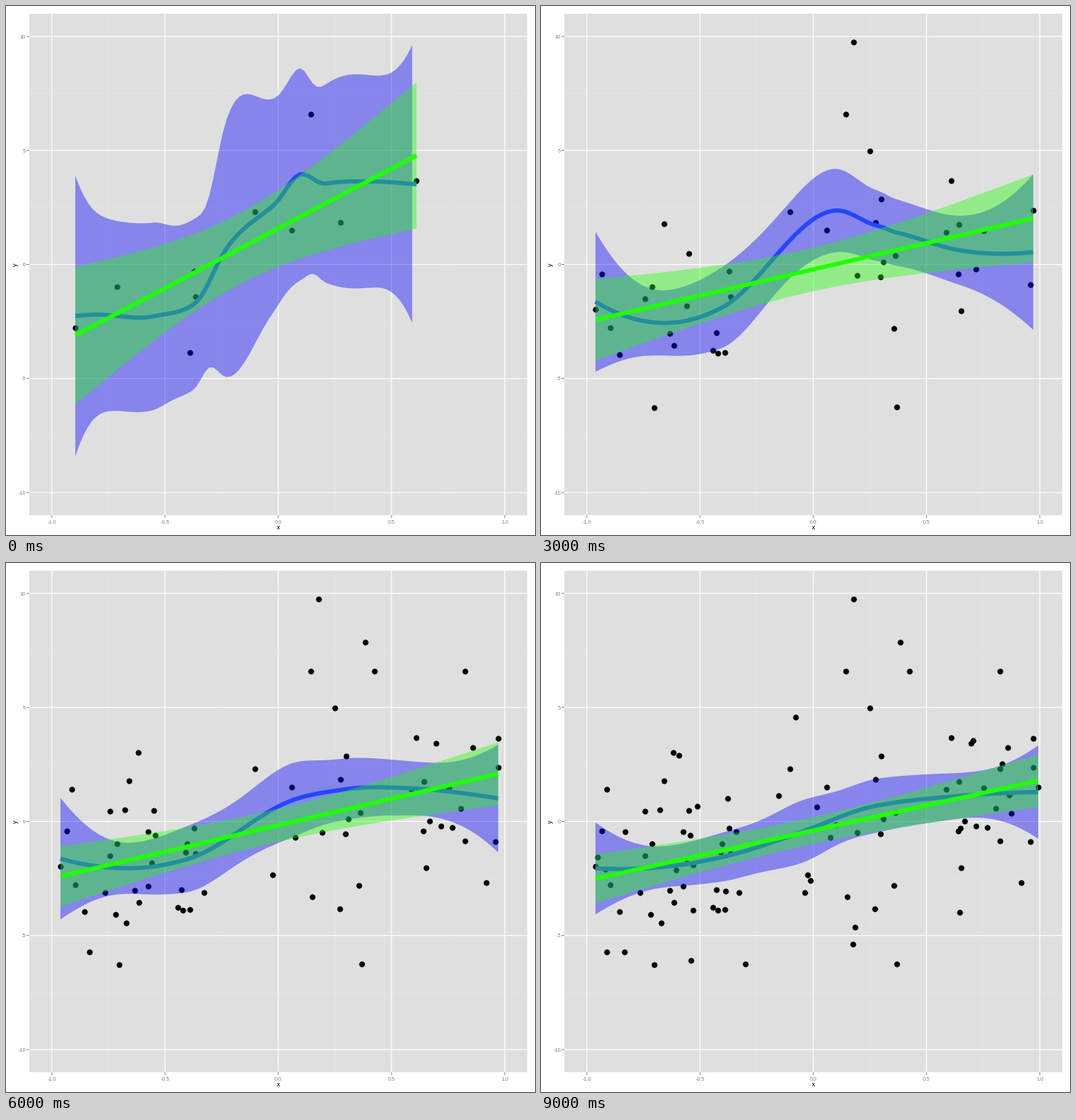
Recreate the animation shown at these times as a matplotlib script. Size 748 by 748 pixels, loop 10 s.

```python
import numpy as np
import matplotlib.pyplot as plt
from matplotlib.animation import FuncAnimation
from matplotlib.patches import Polygon, Rectangle

SIZE, DPI = 748, 100
PT = 72 / DPI                       # points per pixel
LEFT, RIGHT, TOP, BOTTOM = 33, 737, 11, 720
CX, CY, UX, UY = 385, 365.5, 320.2, 32.25

BLUE_FILL = (0, 0, 1)
BLUE_LINE = (38 / 255, 70 / 255, 1)
GREEN = (33 / 255, 1, 6 / 255)

# Samples in stage pixels, one row per stage.
XS = np.array([
    98, 157, 266.5, 268, 260, 352.5, 404.5, 431, 473, 580.5,
    86.5, 147, 209, 188.5, 248, 160.5, 499, 501.5, 626.5, 696,
    174.5, 77, 243, 465, 447.5, 484, 480, 573, 594.5, 503,
    442, 481, 591.5, 590, 615.5, 692, 111, 206.5, 182, 250.5,
    93, 168.5, 201.5, 155.5, 254, 696, 631, 679.5, 147.5, 608,
    201.5, 211, 140, 170.5, 118, 521, 660, 649.5, 433,
    508, 649, 187, 256, 280, 409, 377, 599.5, 472.5, 643.5,
    93, 91.5, 261, 390.5, 417, 373, 649, 703, 593.5, 444.5,
    212.5, 195, 119.5, 264, 80, 215, 381, 441, 652.5, 665,
    221, 276, 191, 215, 289, 336, 360, 592.5, 611, 662])
YS = np.array([
    454.5, 396.5, 375, 410.5, 490, 290.5, 317, 153, 305.5, 246.5,
    379, 413.5, 349.5, 480, 461.5, 567.5, 456, 352.5, 318, 288.5,
    307.5, 428.5, 487, 204.5, 381, 362, 382.5, 320, 430.5, 567,
    51, 273, 309, 378.5, 372, 394, 492.5, 424, 462.5, 490.5,
    320, 348.5, 457, 497, 409, 248, 373.5, 452, 351, 254.5,
    380, 385, 466, 509, 549.5, 152.5, 260.5, 393, 472,
    112, 153, 267.5, 397, 465.5, 387.5, 440.5, 365, 488.5, 346.5,
    549.5, 433, 464, 345, 370, 465.5, 291, 317, 375, 515,
    562, 272, 380, 333, 415.5, 491, 448.5, 539, 283.5, 354,
    344, 380, 434, 427, 566.5, 329, 217.5, 494, 251, 328])
COUNTS = [10, 20, 30, 40, 50, 59, 69, 79, 89, 99]


def t_quantile(df):
    """97.5 % quantile of Student's t."""
    angle = np.linspace(0, np.pi / 2, 20001)
    mass = np.cumsum(np.cos(angle) ** (df - 1))
    return np.sqrt(df) * np.tan(np.interp(0.95, mass / mass[-1], angle))


def linear(x, y, grid):
    n = len(x)
    slope, icept = np.polyfit(x, y, 1)
    rss = np.sum((y - icept - slope * x) ** 2)
    mean = x.mean()
    lever = 1 / n + (grid - mean) ** 2 / np.sum((x - mean) ** 2)
    return icept + slope * grid, t_quantile(n - 2) * np.sqrt(rss / (n - 2) * lever)


def cuts(x, cap):
    """Cut points of the k-d tree over sorted x."""
    if len(x) <= cap:
        return []
    m = (len(x) + 1) // 2
    return cuts(x[:m], cap) + [(x[m - 1] + x[m]) / 2] + cuts(x[m:], cap)


def local_rows(v, x, q):
    """Linear operators for value and slope of the local quadratic at v."""
    dist = np.abs(x - v)
    h = np.sort(dist)[q - 1]
    w = np.clip(1 - (dist / h) ** 3, 0, None) ** 1.5
    design = w[:, None] * np.vander((x - v) / h, 3, increasing=True)
    rows = np.linalg.pinv(design)[:2] * w
    return rows[0], rows[1] / h


def loess(x, y, grid, span=0.75, cell=0.2):
    n = len(x)
    pad = 0.005 * np.ptp(x)
    inner = cuts(np.sort(x), max(1, int(n * span * cell)))
    knots = np.unique([x.min() - pad, *inner, x.max() + pad])
    rows = [local_rows(v, x, int(n * span + 1e-5)) for v in knots]
    val, der = (np.array(r) for r in zip(*rows))

    def operator(at):
        i = np.clip(np.searchsorted(knots, at) - 1, 0, len(knots) - 2)
        h = (knots[i + 1] - knots[i])[:, None]
        s = (at - knots[i])[:, None] / h
        return ((1 + 2 * s) * (1 - s) ** 2 * val[i] + s ** 2 * (3 - 2 * s) * val[i + 1]
                + h * s * (1 - s) ** 2 * der[i] - h * s ** 2 * (1 - s) * der[i + 1])

    resid = np.eye(n) - operator(x)
    gram = resid @ resid.T
    d1, d2 = np.trace(gram), np.sum(gram ** 2)
    sigma = np.sqrt(np.sum((resid @ y) ** 2) / d1)
    rows = operator(grid)
    se = sigma * np.sqrt(np.sum(rows ** 2, axis=1))
    return rows @ y, t_quantile(max(d1 ** 2 / d2, 1.5)) * se


fig = plt.figure(figsize=(SIZE / DPI, SIZE / DPI), dpi=DPI, facecolor="white")
ax = fig.add_axes([0, 0, 1, 1])
ax.set_xlim(0, SIZE)
ax.set_ylim(SIZE, 0)
ax.axis("off")
plt.rcParams["font.family"] = "Liberation Sans"


def rule(xs, ys, color, width):
    ax.plot(xs, ys, color=color, lw=width * PT, snap=False,
            solid_capstyle="butt", zorder=1)


def label(x, y, text, size, color, **kw):
    ax.text(x, y, text, fontsize=size * PT, color=color, **kw)


ax.add_patch(Rectangle((LEFT, TOP), RIGHT - LEFT, BOTTOM - TOP,
                       fc="#dfdfdf", lw=0, zorder=0))
for k in (-3, -1, 1, 3):
    rule([CX + k * UX / 4] * 2, [TOP, BOTTOM], "#e6e6e6", 0.8)
    rule([LEFT, RIGHT], [CY + k * 2.5 * UY] * 2, "#e6e6e6", 0.8)
for k in range(-2, 3):
    gx, gy = CX + k * UX / 2, CY - k * 5 * UY
    rule([gx, gx], [TOP, BOTTOM], "white", 1.3)
    rule([LEFT, RIGHT], [gy, gy], "white", 1.3)
    rule([gx, gx], [BOTTOM, BOTTOM + 4], "#7f7f7f", 1)
    rule([LEFT - 4, LEFT], [gy, gy], "#7f7f7f", 1)
    label(gx, 731.7, f"{k / 2:.1f}", 7.4, "#7f7f7f", ha="center", va="baseline")
    label(28, gy + 2.7, f"{5 * k}", 7.4, "#7f7f7f", ha="right", va="baseline")
label(CX, 740.5, "x", 9.3, "black", ha="center", va="baseline")
label(13, CY, "y", 9.3, "black", ha="center", va="center", rotation=90)

dots = ax.scatter([], [], s=(8.2 * PT) ** 2, c="black", lw=0, zorder=2)


def smoother(fill, color, z):
    band = ax.add_patch(Polygon(np.zeros((3, 2)), fc=fill, alpha=0.4, lw=0, zorder=z))
    line, = ax.plot([], [], color=color, lw=6 * PT,
                    solid_capstyle="butt", zorder=z + 1)
    return band, line


curves = [(loess, *smoother(BLUE_FILL, BLUE_LINE, 3)),
          (linear, *smoother(GREEN, GREEN, 5))]


def draw(stage):
    n = COUNTS[stage]
    x, y = XS[:n], YS[:n]
    dots.set_offsets(np.column_stack([x, y]))
    grid = np.linspace(x.min(), x.max(), 80)
    for fit, band, line in curves:
        mid, half = fit(x, y, grid)
        line.set_data(grid, mid)
        # Band parts beyond the scale limits are dropped.
        ok = (mid - half > CY - 10 * UY) & (mid + half < CY + 10 * UY)
        g, lo, hi = grid[ok], (mid + half)[ok], (mid - half)[ok]
        band.set_xy(np.column_stack([np.r_[g, g[::-1]], np.r_[hi, lo[::-1]]]))
    return [dots] + [a for _, *pair in curves for a in pair]


anim = FuncAnimation(fig, draw, frames=len(COUNTS), interval=1000,
                     init_func=lambda: draw(0), repeat=True, repeat_delay=0)
plt.show()
```
